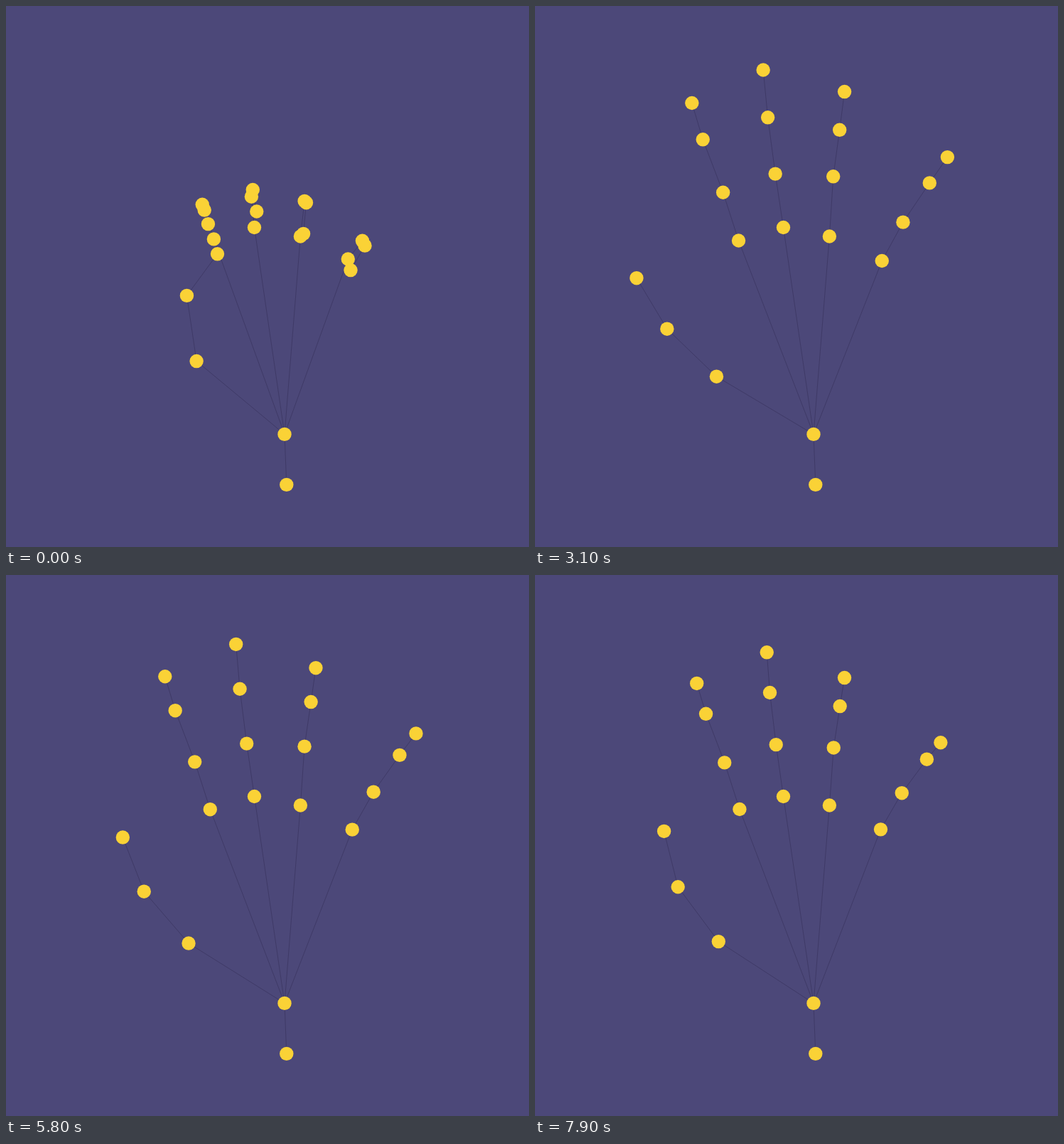
Write an HTML page with a canvas that moves like this. It is 736 px wide and 761 px high and loops after 8 s.

```html
<!DOCTYPE html>
<html lang="en">
<head>
<meta charset="utf-8">
<title>Hand joints</title>
<style>
html, body { margin: 0; width: 100%; height: 100%; overflow: hidden; background: #4c4879; }
canvas { display: block; }
</style>
</head>
<body>
<canvas id="stage" width="736" height="761"></canvas>
<script>
const ctx = document.getElementById('stage').getContext('2d');
const LOOP = 8000, STEP = 100, OPEN_AT = 300, RADIUS = 9.7;
const CURL_PER_SECOND = 0.047; // curl 0 is a flat hand, 1 a fist
const RAD = Math.PI / 180;

const arm = [394.8, 673.4];
const wrist = [392, 602.4];

// flatAt: second at which the digit lies flat; flat: its joints then.
const thumb = {
  flatAt: 0.9,
  flat: [[254.2, 523.8], [179.4, 462], [126.5, 396]],
  turn: [10, 42, 75],      // degrees each bone swings in the picture plane
  shrink: [-0.015, 0.04, 0.14]
};

// bend: degrees each bone tips towards the viewer in a fist;
// slide: how far the knuckle moves; lean: sideways drift of tipped bones.
const fingers = [
  { flatAt: 2, flat: [[286.2, 330.1], [264.3, 262.3], [235.8, 187.6], [220.3, 136]],
    bend: [53, 84, 122], slide: [6.2, -2.2], lean: 0 },
  { flatAt: 2, flat: [[349.5, 311.5], [338, 236], [327.2, 156.5], [320.4, 89.3]],
    bend: [55, 83, 117], slide: [0, 0], lean: 0.04 },
  { flatAt: 1.5, flat: [[414.4, 324], [419.5, 239.6], [428.2, 173.6], [434.8, 118.9]],
    bend: [54, 92, 143], slide: [0, 0], lean: 0.04 },
  { flatAt: 0.8, flat: [[489.1, 358.8], [518.1, 304.1], [554.6, 247.9], [579.2, 210]],
    bend: [62, 97, 155], slide: [-7.8, -2.8], lean: 0.12 }
];

function curlOf(digit, t) {
  return t < OPEN_AT ? 1 : CURL_PER_SECOND * (t / 1000 - digit.flatAt);
}

// Lays bones end to end from a start point; pose changes each flat bone.
function chain(start, flat, flatStart, pose) {
  const points = [start];
  flat.forEach(([x, y], i) => {
    const [fx, fy] = i ? flat[i - 1] : flatStart;
    const [dx, dy] = pose(x - fx, y - fy, i);
    const [px, py] = points[i];
    points.push([px + dx, py + dy]);
  });
  return points;
}

function thumbPoints(t) {
  const curl = curlOf(thumb, t);
  return chain(wrist, thumb.flat, wrist, (dx, dy, i) => {
    const a = thumb.turn[i] * curl * RAD;
    const size = 1 - thumb.shrink[i] * curl;
    return [size * (dx * Math.cos(a) - dy * Math.sin(a)),
            size * (dx * Math.sin(a) + dy * Math.cos(a))];
  });
}

function fingerPoints(finger, t) {
  const curl = curlOf(finger, t);
  const [flatKnuckle, ...rest] = finger.flat;
  const knuckle = flatKnuckle.map((v, i) => v + finger.slide[i] * curl);
  const bones = chain(knuckle, rest, flatKnuckle, (dx, dy, i) => {
    const a = finger.bend[i] * curl * RAD;
    const drift = finger.lean * Math.hypot(dx, dy) * Math.sin(a);
    return [dx * Math.cos(a) + drift, dy * Math.cos(a)];
  });
  return [wrist, ...bones];
}

function draw(t) {
  const chains = [[wrist, arm], thumbPoints(t), ...fingers.map(f => fingerPoints(f, t))];

  ctx.fillStyle = '#4c4879';
  ctx.fillRect(0, 0, 736, 761);

  ctx.strokeStyle = '#3f3a67';
  ctx.lineWidth = 1;
  for (const points of chains) {
    ctx.beginPath();
    points.forEach(([x, y]) => ctx.lineTo(x, y));
    ctx.stroke();
  }

  ctx.fillStyle = '#fad236';
  for (const [x, y] of [wrist, ...chains.flatMap(c => c.slice(1))]) {
    ctx.beginPath();
    ctx.arc(x, y, RADIUS, 0, Math.PI * 2);
    ctx.fill();
  }
}

const start = performance.now();
function frame() {
  const t = (performance.now() - start) % LOOP;
  draw(Math.floor(t / STEP) * STEP);
  requestAnimationFrame(frame);
}
frame();
</script>
</body>
</html>
```
